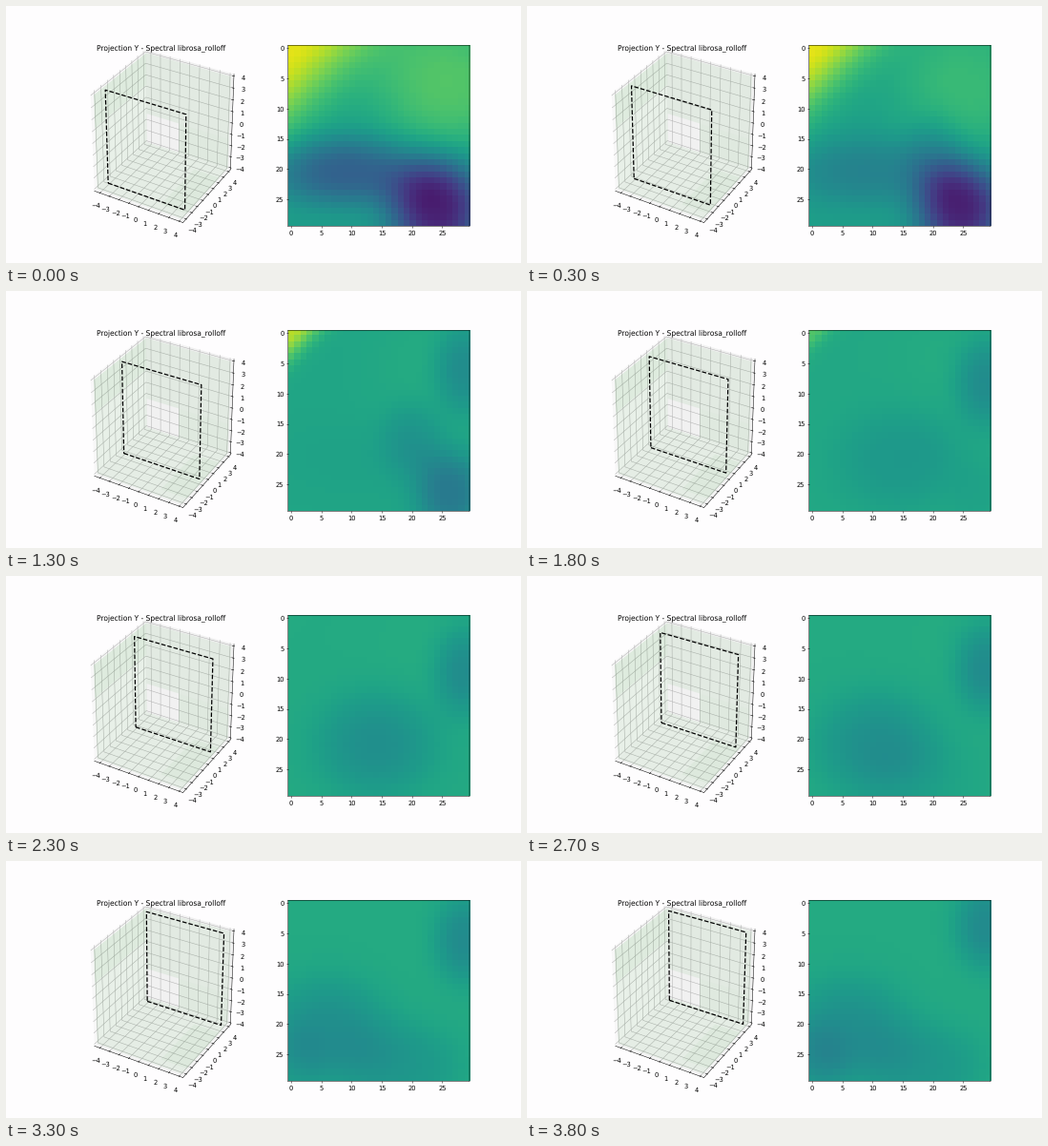
These frames come from a looping animation (540x270 px, 3.9 s). A matplotlib script:

```python
import numpy as np
import matplotlib.pyplot as plt
from matplotlib.animation import FuncAnimation
from matplotlib.patches import Polygon

plt.rcParams.update({"text.hinting": "none", "xtick.labelsize": 10.5,
                     "ytick.labelsize": 10.5})

FRAMES, INTERVAL = 39, 100
LOW, HIGH, STEP = -4, 3.8, 0.2            # slice positions along x and y
MID = (LOW + HIGH) / 2
REACH = 0.55 * (HIGH - LOW)               # half the range plus a 5 % margin
CENTRE = np.array([MID, MID, 0])
HALF = np.array([REACH, REACH, 4])
PANE = 0.5 * 25 / 24                      # half size of the cube with its margin
BACK = PANE * np.array([-1, 1, -1])       # corner where the three walls meet

# View from elevation 30, azimuth -60, distance 10
RIGHT = np.array([0.8660, 0.5, 0])
UP = np.array([-0.25, 0.4330, 0.8660])
TOWARD = np.array([0.4330, -0.75, 0.5])


def project(points):
    """Perspective view of points in the unit cube centred on the origin."""
    p = np.atleast_2d(points)
    depth = 10 - p @ TOWARD
    return np.column_stack([p @ RIGHT / depth, p @ UP / depth])


def scale(points):
    return (np.asarray(points, float) - CENTRE) / (2 * HALF)


def rect(axis, at, a, b):
    """Corners of a rectangle normal to one axis; a, b span the other two."""
    corners = [(a[0], b[0]), (a[1], b[0]), (a[1], b[1]), (a[0], b[1])]
    return [np.insert(np.array(c, float), axis, at) for c in corners]


fig = plt.figure(figsize=(12, 6), dpi=45, facecolor="#fefdfe")
ax, ax_map = fig.subplots(1, 2)
ax.set_xlim(-0.095, 0.09)
ax.set_ylim(-0.095, 0.09)
ax.axis("off")
ax.text(0.5, 0.935, "Projection Y - Spectral librosa_rolloff", fontsize=12,
        ha="center", va="baseline", transform=ax.transAxes)


def fill(corners, color, alpha, z):
    ax.add_patch(Polygon(project(corners), facecolor=color, alpha=alpha,
                         lw=0, zorder=z))


def line(points, color, z):
    ax.plot(*project(points).T, color=color, lw=0.8, zorder=z, snap=False)


def flipped(point, axis):
    out = point.copy()
    out[axis] *= -1
    return out


def draw_axis(axis, grey):
    """Wall, edge, grid, tick marks and labels of one axis."""
    first, second = [i for i in range(3) if i != axis]
    edge = flipped(BACK, first)
    bend = np.array([edge, BACK, flipped(BACK, second)])
    fill(rect(axis, BACK[axis], (-PANE, PANE), (-PANE, PANE)), grey, 0.5, 1)
    line([edge, flipped(edge, axis)], "black", 4)

    for value in range(-4, 5):
        pos = (value - CENTRE[axis]) / (2 * HALF[axis])
        bend[:, axis] = edge[axis] = pos
        line(bend, "#b0b0b0", 2)

        mark = np.array([edge, edge])
        mark[:, first] += np.sign(edge[first]) * np.array([1, -2]) / 120
        line(mark, "black", 4)

        label = edge + 0.0722 * np.sign(edge)
        label[axis] = pos
        ax.text(*project(label)[0], str(value).replace("-", "\u2212"),
                fontsize=10.5, ha="center", va="top")


for axis, grey in enumerate(("0.95", "0.90", "0.925")):
    draw_axis(axis, grey)


def shade(axis, a, b, alpha):
    """Green tint on one wall, spans given in fractions of the wall."""
    a, b = np.array(a) - 0.5, np.array(b) - 0.5
    fill(rect(axis, np.sign(BACK[axis]) / 2, a, b), "green", alpha, 2.5)


WHOLE = (0, 1)
shade(0, WHOLE, WHOLE, 0.06)
shade(0, WHOLE, (0.66, 1), 0.04)
shade(1, WHOLE, (0.33, 1), 0.06)
shade(1, (0.4, 1), (0, 0.33), 0.07)
shade(2, WHOLE, WHOLE, 0.06)
shade(2, (0.7, 1), (0.1, 0.8), 0.03)

plane, = ax.plot([], [], "k--", lw=2, zorder=6)

# Heat map: soft blobs that drift, grow and fade
col, row = np.meshgrid(np.arange(30), np.arange(30))


def ease(frame, start, end):
    t = np.clip((frame - start) / (end - start), 0, 1)
    return t * t * (3 - 2 * t)


def blob(height, x, y, width, depth):
    q = ((col - x) / width) ** 2 / 2 + ((row - y) / depth) ** 2 / 2
    return height * np.exp(-q ** 1.3)


def heat_at(f):
    corner = 9 * np.exp(-f / 12)
    total = 0.56 + 0.05 * ease(f, 0, 25)
    total = total + 0.4 * (1 - ease(f, 8, 24)) * np.exp(-((col + row) / corner) ** 2 / 2)
    total += blob(0.17 * np.exp(-f / 8), 26, 6, 9, 8)
    # dark pool in the lower right with its trail
    total += blob(-0.47 / (1 + np.exp((f - 12) / 2)), 24 + f / 6, 26.5,
                  5.5 - f / 8, 5.5 - f / 15)
    total += blob(-0.11 * ease(f, 0, 4) * (1 - ease(f, 9, 20)), 20, 18, 3.5, 4.5)
    # blue band that fades early
    total += blob(-0.25 * np.exp(-f / 4), 9, 20.5, 9, 4)
    # teal patch on the right edge
    total += blob(-0.13 * ease(f, 2, 9), 28.5, 2 + 7 * np.sin(np.pi * f / 46) ** 2, 3.5, 5)
    # late teal clouds along the bottom
    total += blob(-0.11 * ease(f, 12, 23), 14 - 8 * ease(f, 23, 32), 21, 7, 6)
    total += blob(-0.08 * ease(f, 23, 33), 18, 27, 7, 5)
    total += blob(-0.08 * ease(f, 28, 37), 1, 26, 3.5, 4)
    return total


heat = ax_map.imshow(heat_at(0), cmap="viridis", vmin=0, vmax=1,
                     interpolation="nearest")
for spine in ax_map.spines.values():
    spine.set_snap(False)


def update(frame):
    index = np.interp(frame, [0, 3, 8, 34], [4, 8, 12, 39])
    corners = rect(1, LOW + STEP * index, (LOW, HIGH), (-4, 4))
    plane.set_data(*project(scale(corners + corners[:1])).T)
    heat.set_data(heat_at(frame))
    return plane, heat


anim = FuncAnimation(fig, update, frames=FRAMES, interval=INTERVAL,
                     repeat=True, repeat_delay=0)
plt.show()
```
